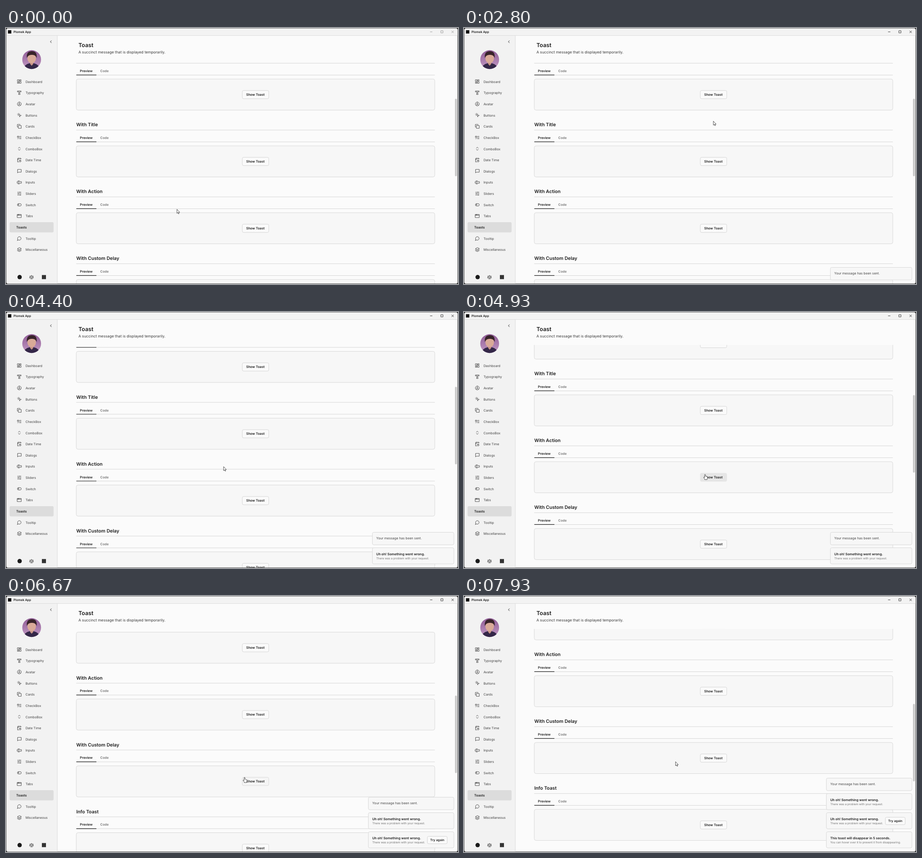
Recreate the animation shown at these times as an HTML page. Size 995x563 px, loop 8000 ms.

```html
<!DOCTYPE html>
<html lang="en">
<head>
<meta charset="utf-8">
<title>Toast demo</title>
<style>
html, body { margin: 0; width: 100%; height: 100%; overflow: hidden; background: #161616; }
svg { display: block; width: 100vw; height: 100vh; }
text { font-family: Inter, "Liberation Sans", sans-serif; font-size: 7.19px; fill: #1c1c1c; text-rendering: geometricPrecision; white-space: pre; }
.b { font-weight: 600; }
.h { font-weight: 600; font-size: 10.27px; }
.nav { fill: #424242; }
.off { font-weight: 600; fill: #757575; }
.small { font-size: 6.2px; fill: #707070; }
.mid { text-anchor: middle; }
.icon { fill: none; stroke: #333; stroke-width: 1.9; stroke-linecap: round; stroke-linejoin: round; }
.rule { stroke: #d6d6d6; }
.card { fill: #f7f7f7; stroke: #d8d8d8; }
</style>
</head>
<body>
<svg viewBox="0 0 995 563">
  <defs>
    <linearGradient id="dusk" x2="0" y2="1">
      <stop offset="0" stop-color="#8f5c96"/><stop offset="1" stop-color="#c39ac4"/>
    </linearGradient>
    <clipPath id="face"><circle cx="56.5" cy="69.5" r="20.7"/></clipPath>
    <clipPath id="view"><rect x="114" y="72.5" width="880" height="489.5"/></clipPath>
    <clipPath id="win"><rect x=".8" y=".8" width="993.4" height="561.4" rx="3.5"/></clipPath>
  </defs>
  <g clip-path="url(#win)">
    <rect width="995" height="563" fill="#fbfbfb"/>
    <rect width="995" height="16.5" fill="#f3f3f3"/>
    <rect y="16.5" width="113" height="547" fill="#f2f2f2"/>
    <path d="M0 16.5H995M113 17V563" stroke="#dcdcdc" fill="none"/>
    <rect x="4.3" y="4.8" width="7.4" height="7.4" fill="#111"/>
    <text class="b" x="16.4" y="11" style="font-size:6.7px">Plomek App</text>
    <path id="controls" d="M933.5 8.5h5M957.2 6h4.8v4.8h-4.8zM980.7 6l5 5M985.7 6l-5 5" fill="none" stroke-width=".8"/>

    <path d="M100.2 27.6L97.6 30.2l2.6 2.6" fill="none" stroke="#222"/>
    <g clip-path="url(#face)">
      <rect x="35" y="48" width="43" height="43" fill="url(#dusk)"/>
      <path d="M38 91Q40 80 52 77.5H61Q73 80 75 91Z" fill="#342748"/>
      <path d="M53 74h7v5l-3.5 4-3.5-4z" fill="#c89486"/>
      <ellipse cx="56.5" cy="66.5" rx="9.5" ry="11" fill="#d9aa98"/>
      <path d="M46 66Q44 52 56 51Q69 50 67.5 66Q65 59 58 59Q49 58 46 66Z" fill="#38232a"/>
    </g>
    <g id="nav"></g>
    <circle cx="30" cy="547.8" r="4.8" fill="#1b1b1b"/>
    <rect x="79" y="543.3" width="9" height="9" fill="#333"/>

    <text class="b" x="159.4" y="42.2" style="font-size:12.3px">Toast</text>
    <text x="159.4" y="55.9" style="font-size:8.21px;fill:#383838">A succinct message that is displayed temporarily.</text>
    <g clip-path="url(#view)"><g id="page"></g></g>
    <rect id="bar" x="988.4" width="4.4" height="170.5" rx="2" fill="#c8c8c8"/>
    <g id="toasts"></g>
    <g id="pointer" fill="#fff" stroke="#1a1a1a" stroke-width=".75" stroke-linejoin="round">
      <path id="arrow" d="M0 0V8.9L2 7.1L3.4 10.1L4.7 9.5L3.4 6.6H6.1Z"/>
      <path id="hand" d="M-1 1Q-1 0 0 0T1 1V4Q2 3.4 2.5 4.4Q3.5 3.9 4 4.9Q5 4.5 5.2 5.7V8.2L4.5 10.2V11.4H-.7V10.2L-2.9 7.3Q-3.6 6.2 -2.8 5.9Q-2.2 5.8 -1 7Z"/>
    </g>
  </g>
</svg>
<script>
const $ = id => document.getElementById(id);
const clamp = x => Math.min(1, Math.max(0, x));
const smooth = x => (x = clamp(x), x * x * (3 - 2 * x));
const LOOP = 8000, TICK = 25.67, PITCH = 147;

const text = (x, y, s, cls = "") => `<text x="${x}" y="${y}" class="${cls}">${s}</text>`;
const icon = (x, y, d) =>
  `<path class="icon" transform="translate(${x} ${y}) scale(.43) translate(-12 -12)" d="${d}"/>`;

// Sidebar
const items = [
  ["Dashboard", "M3 3h7v9H3zM14 3h7v5h-7zM14 12h7v9h-7zM3 16h7v5H3z"],
  ["Typography", "M3 3h18v5h-4V7h-3v10h2v4H8v-4h2V7H7v1H3z"],
  ["Avatar", "M12 2a10 10 0 1 0 .01 0M12 7a3 3 0 1 0 .01 0M6.2 19a6 5 0 0 1 11.6 0"],
  ["Buttons", "M9 9l5 12 1.8-5.2L21 14zM7.2 2.2L8 5.1M5.1 8L2.2 7.2M14 4.1L12 6M6 12l-1.9 2"],
  ["Cards", "M8 8h14v14H8zM4 16H2V2h14v2"],
  ["CheckBox", "M3 5h6v6H3zM3 17l2 2 4-4M13 6h8M13 12h8M13 18h8"],
  ["ComboBox", "M7 15l5 5 5-5M7 9l5-5 5 5"],
  ["Date Time", "M21 7V4H3v18h6M8 2v4M16 2v4M3 10h6M16 12a5 5 0 1 0 .01 0M16 14v3l2 1"],
  ["Dialogs", "M21 3H3v18l4-4h14z"],
  ["Inputs", "M5 4h2q2 0 2 2v12q0 2-2 2H5M13 4h-2q-2 0-2 2M13 20h-2q-2 0-2-2M5 16H1V8h4M13 8h10v8H13"],
  ["Sliders", "M21 5h-7M10 5H3M21 12h-9M8 12H3M21 19h-5M12 19H3M14 3v4M8 10v4M16 17v4"],
  ["Switch", "M8 6h8a6 6 0 0 1 0 12H8a6 6 0 0 1 0-12M8 10a2 2 0 1 0 .01 0"],
  ["Tabs", "M2 4h20v16H2zM2 8h20M6 4v4M10 4v4"],
  ["Toasts"],
  ["Tooltip", "M7.9 20A9 9 0 1 0 4 16.1L2 22Z"],
  ["Miscellaneous", "M12 2L2 7l10 5 10-5zM2 12l10 5 10-5M2 17l10 5 10-5"]
];
const scales = "M16 16l3-8 3 8q-3 2-6 0M2 16l3-8 3 8q-3 2-6 0M7 21h10M12 3v18M3 7h2c2 0 5-1 7-2 2 1 5 2 7 2h2";
$("nav").innerHTML = items.map(([name, d], i) => {
  const y = 118 + i * 24.65;
  return d
    ? icon(29.3, y - .3, d) + text(42.9, y + 2.6, name, "nav")
    : `<rect x="7.8" y="${y - 11.5}" width="97" height="22.5" rx="3" fill="#dcdcdc"/>` + text(22.6, y + 2.6, name, "b");
}).join("") + icon(56.2, 547.8, scales);

// Page sections
const titles = ["", "With Title", "With Action", "With Custom Delay", "Info Toast"];
$("page").innerHTML = titles.map((title, i) => `<g transform="translate(0 ${i * PITCH})">
  ${text(154.7, 69.3, title, "h")}
  <path class="rule" d="M154.5 77.4H944M154.5 103.5H944"/>
  ${text(162.8, 97.2, "Preview", "b")}${text(207.6, 97.2, "Code", "off")}
  <path d="M154.8 103.4H199" stroke="#1c1c1c" stroke-width="1.2"/>
  <rect class="card" x="154.7" y="112.2" width="789.2" height="68.4" rx="4"/>
  <rect class="btn" x="520.2" y="137.4" width="58.2" height="18.2" rx="3"/>
  ${text(549, 149.1, "Show Toast", "b mid")}</g>`).join("");
const buttons = [...document.querySelectorAll(".btn")];

// Toasts, oldest first
const oops = ["Uh oh! Something went wrong.", "There was a problem with your request."];
const toasts = [
  { at: 1780, h: 27.5, lines: ["Your message has been sent."] },
  { at: 3555, h: 35.5, lines: oops },
  { at: 5430, h: 35.5, lines: oops, action: "Try again" },
  { at: 7255, h: 35.5, lines: ["This toast will disappear in 5 seconds.", "You can hover over it to prevent it from disappearing."] }
];
for (const o of toasts) {
  const g = document.createElementNS("http://www.w3.org/2000/svg", "g");
  const top = 554 - o.h, [a, b] = o.lines;
  g.innerHTML = `<rect class="card" y="${top}" height="${o.h}" rx="3"/><g>` +
    (b ? text(8.6, top + 16, a, "b") + text(8.6, top + 25.8, b, "small") : text(8.6, top + 15.9, a, "nav")) +
    (o.action ? `<rect x="129.8" y="${top + 10}" width="43.8" height="16.4" rx="3" fill="#fafafa" stroke="#d4d4d4"/>` +
      `<text class="b mid" x="151.7" y="${top + 20.6}" style="font-size:6.9px">${o.action}</text>` : "") + "</g>";
  $("toasts").append(g);
  o.g = g;
  o.box = g.firstChild;
}

// Pointer stops: time, x, y
const path = [
  [0, 376.3, 398.7], [110, 376.3, 398.7], [130, 375.8, 398.4], [450, 375.8, 398.4], [470, 374, 398.2],
  [850, 374, 398.2], [1660, 536.4, 148.8], [2480, 536.4, 148.8], [2900, 551, 214],
  [3330, 541, 292.6], [3680, 541, 292.6], [4200, 479, 340], [4560, 479, 340],
  [4930, 530.6, 357.2], [5200, 537, 358.6], [5480, 537, 358.6], [6000, 477.2, 363.7],
  [6270, 477.2, 363.7], [6850, 539.2, 409.2], [7400, 539.2, 409.2], [7900, 465.7, 364.4], [LOOP, 465.7, 364.4]
];
const wheel = [4400, 4470, 4530, 6330, 6400, 6470, 6530, 7670, 7800];

function pointer(t) {
  const i = Math.max(1, path.findIndex(p => p[0] > t));
  const [t0, x0, y0] = path[i - 1], [t1, x1, y1] = path[i];
  const k = smooth((t - t0) / (t1 - t0));
  return [x0 + (x1 - x0) * k, y0 + (y1 - y0) * k];
}
const scroll = t => TICK * wheel.filter(w => t >= w).length;

// Index of the button under the pointer, or -1
function hovered(t) {
  const [x, y] = pointer(t);
  return buttons.findIndex((_, i) => {
    const top = 137 + i * PITCH - scroll(t);
    return x > 520 && x < 579 && y > top && y < top + 19;
  });
}
const grey = v => `rgb(${v},${v},${v})`;

function draw(t) {
  const s = scroll(t);
  $("page").setAttribute("transform", `translate(0 ${-s})`);
  $("bar").setAttribute("y", 155.5 + s * .3535);
  $("controls").setAttribute("stroke", t < 1670 ? "#8c8c8c" : "#111");

  const trail = [0, 30, 60, 90].map(d => hovered(Math.max(0, t - d)));
  buttons.forEach((b, i) => {
    const k = trail.filter(n => n === i).length / 4;
    b.style.fill = grey(Math.round(250 - 20 * k));
    b.style.stroke = grey(Math.round(214 + 16 * k));
  });

  const left = t < toasts[2].at ? 806.5 : 797.7;
  let lift = 0;
  for (const o of [...toasts].reverse()) {
    const grow = clamp((t - o.at) / 115), fade = smooth((t - o.at) / 420);
    const y = 42 * (1 - grow) + 4 * (1 - fade) - lift;
    o.g.setAttribute("transform", `translate(${left} ${y})`);
    o.g.setAttribute("opacity", fade);
    o.box.setAttribute("width", 986 - left);
    lift += 42 * grow;
  }

  const [x, y] = pointer(t), over = trail[0] >= 0;
  $("pointer").setAttribute("transform", `translate(${x} ${y})`);
  $("hand").style.display = over ? "" : "none";
  $("arrow").style.display = over ? "none" : "";
}

const start = performance.now();
function frame(now) {
  draw(Math.max(0, now - start) % LOOP);
  requestAnimationFrame(frame);
}
draw(0);
requestAnimationFrame(frame);
</script>
</body>
</html>
```
